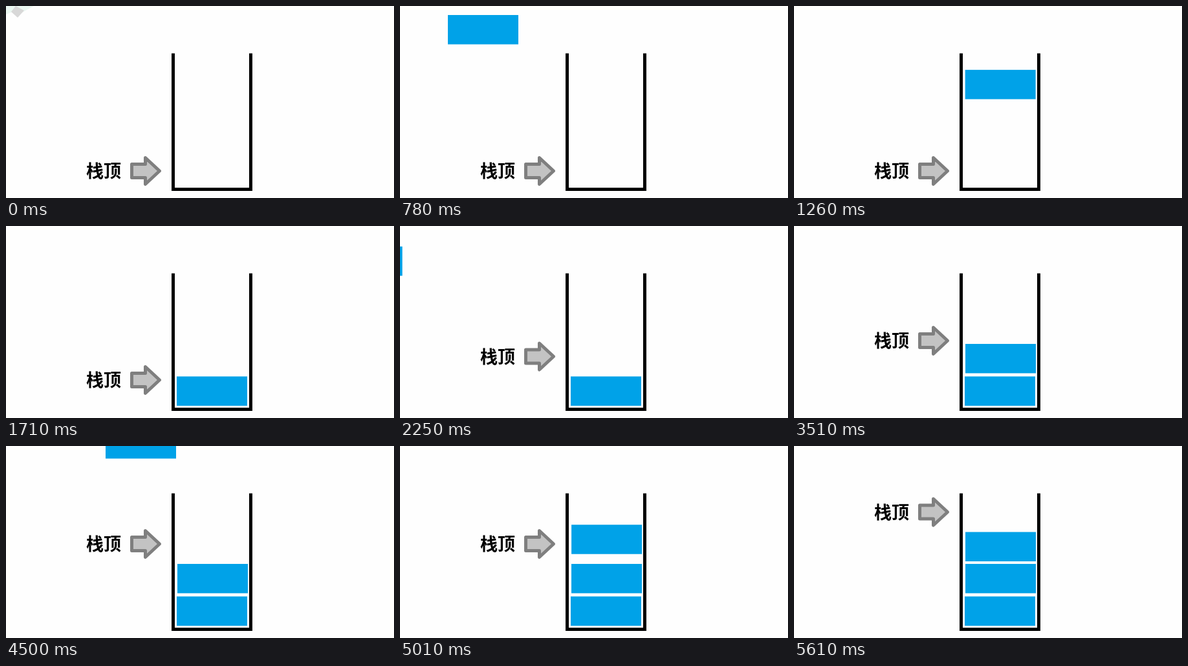
An HTML page that plays this animation: 600 px wide and 298 px high, repeating every 6.03 s.

```html
<!DOCTYPE html>
<html lang="zh-CN">
<head>
<meta charset="utf-8">
<title>入栈</title>
<style>
  html, body { margin: 0; width: 100%; height: 100%; overflow: hidden; background: #fefefe; }
  svg { display: block; width: 600px; height: 298px; }
  text { font: bold 27px "Noto Sans CJK SC", "Noto Sans CJK", sans-serif; }
  .block { fill: #00a2e8; }
  .arrow { fill: #c3c3c3; stroke: #7f7f7f; stroke-width: 5; stroke-linejoin: round; }
  .stack { fill: none; stroke: #000; stroke-width: 5; }
</style>
</head>
<body>
<svg viewBox="0 0 600 298">
  <g id="corner">
    <path fill="#ebf7f2" d="M0 0H43L25 10 10 9 0 13Z"/>
    <path fill="#d8d8d8" d="M15 0L28 7 18 18 8 9Z"/>
  </g>
  <path class="stack" d="M258.5 73.5V284.5H378.5V73.5"/>
  <rect class="block" width="109" height="45.5"/>
  <rect class="block" width="109" height="45.5"/>
  <rect class="block" width="109" height="45.5"/>
  <g id="pointer">
    <text x="124" y="10">栈顶</text>
    <path class="arrow" d="M194.5 -10.5H215.5V-20.5L237.5 0 215.5 20.5V10.5H194.5Z"/>
  </g>
</svg>
<script>
const LOOP = 6030, STEP = 30;

// Waypoints of each block: [ms, x, y]
const paths = [
  [[90, -170, 18], [630, 5, 15], [780, 74, 14], [980, 185, -8], [1110, 250, 8],
   [1180, 264, 42], [1300, 264, 126], [1500, 264, 233.5]],
  [[2010, -170, 38], [2520, 30, 16], [2730, 150, -8], [2900, 235, -8],
   [3000, 262, 30], [3130, 265, 110], [3270, 265, 183]],
  [[3770, -170, 42], [4300, 42, 22], [4410, 103, 3], [4500, 154, -26], [4650, 230, -40],
   [4760, 263, 5], [4900, 265, 80], [5080, 265, 133.5]]
];

// Pointer moves: [start, end, from, to]
const lifts = [
  [1520, 2025, 256, 202.5],
  [3265, 3765, 202.5, 152],
  [5110, 5610, 152, 102.5]
];

const clamp = v => Math.min(1, Math.max(0, v));
const smooth = v => v * v * (3 - 2 * v);

// Slope through the neighbours, zero at both ends
function slope(pts, i, k) {
  const a = pts[i - 1], b = pts[i + 1];
  return a && b ? (b[k] - a[k]) / (b[0] - a[0]) : 0;
}

// Cubic Hermite curve through the waypoints
function along(pts, t, k) {
  const last = pts.length - 1;
  if (t <= pts[0][0]) return pts[0][k];
  if (t >= pts[last][0]) return pts[last][k];
  const i = pts.findIndex(p => p[0] > t) - 1;
  const p = pts[i], q = pts[i + 1], d = q[0] - p[0], u = (t - p[0]) / d;
  const s = smooth(u), v = 1 - u;
  return p[k] * (1 - s) + q[k] * s
    + d * u * v * (v * slope(pts, i, k) - u * slope(pts, i + 1, k));
}

const blocks = document.querySelectorAll('.block');
const pointer = document.getElementById('pointer');
const corner = document.getElementById('corner');
const place = (el, x, y) => el.setAttribute('transform', `translate(${x} ${y})`);

function draw(now) {
  const t = Math.floor(now % LOOP / STEP) * STEP;
  blocks.forEach((el, i) => place(el, along(paths[i], t, 1), along(paths[i], t, 2)));
  const y = lifts.reduce((sum, [a, b, from, to]) =>
    sum + (to - from) * smooth(clamp((t - a) / (b - a))), lifts[0][2]);
  place(pointer, 0, y);
  corner.setAttribute('visibility', t < 660 ? 'visible' : 'hidden');
}

const start = performance.now();
function tick() {
  draw(performance.now() - start);
  requestAnimationFrame(tick);
}
tick();
</script>
</body>
</html>
```
